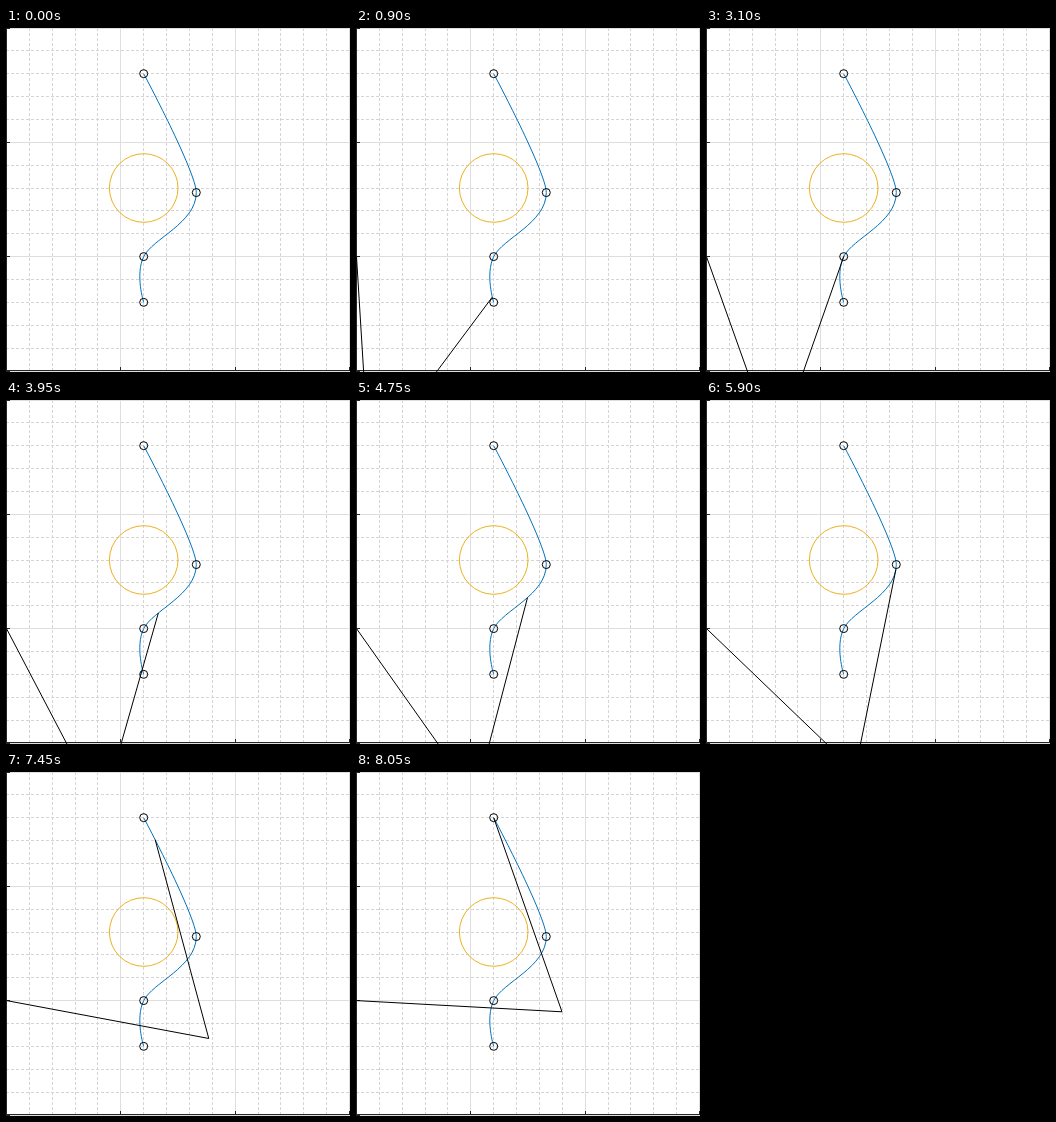
Animation of 344 by 344 pixels, one loop 8.1 s. Source, as an HTML page:

```html
<!DOCTYPE html>
<html lang="en">
<head>
<meta charset="utf-8">
<title>Two-link arm following a path</title>
<style>
html, body { margin: 0; width: 100%; height: 100%; overflow: hidden; background: #fff; }
svg { display: block; width: 344px; height: 344px; }
</style>
</head>
<body>
<svg viewBox="0 0 344 344" fill="none" stroke-width="1">
  <path id="minor" stroke="#d4d4d4" stroke-dasharray="3 2"/>
  <path id="major" stroke="#dedede"/>
  <path id="axes" stroke="#262626"/>
  <path id="curve" stroke="#0072bd"/>
  <circle id="obstacle" stroke="#edb120"/>
  <g id="markers" stroke="#000"></g>
  <path id="arm" stroke="#000" stroke-linejoin="round"/>
</svg>
<script>
const UNIT = 343 / 3, BASE = { x: 0.5, y: 228.6 }, LINK = 1.8;
const LOOP = 8100, START = 100, STEP = 50, SAMPLES = 160, DURATION = 8;

// Points on the path with their times and velocities
const knots = [
  { t: 0, x: 1.2,  y: -0.4, vx: 0,      vy: 0 },
  { t: 3, x: 1.2,  y: 0,    vx: 0.0767, vy: 0.158 },
  { t: 6, x: 1.66, y: 0.56, vx: 0,      vy: 0.265 },
  { t: 8, x: 1.2,  y: 1.6,  vx: 0,      vy: 0 }
];

const el = id => document.getElementById(id);
const px = x => BASE.x + x * UNIT;
const py = y => BASE.y - y * UNIT;
const at = (x, y) => `${px(x).toFixed(2)} ${py(y).toFixed(2)}`;

function drawGrid() {
  let minor = '', major = '', axes = 'M.5 0V343M0 342.5H344';
  for (let i = 0; i <= 15; i++) {
    const x = Math.floor(i * UNIT / 5 + 0.5) + 0.5;
    const y = Math.floor(i * UNIT / 5) + 0.5;
    const lines = `M${x} 0V343M0 ${y}H344`;
    if (i % 5) {
      minor += lines;
    } else {
      major += lines;
      axes += `M${x} 342v-3M0 ${y}h4`;
    }
  }
  el('minor').setAttribute('d', minor);
  el('major').setAttribute('d', major);
  el('axes').setAttribute('d', axes);
}

function addCircle(node, x, y, r) {
  node.setAttribute('cx', px(x));
  node.setAttribute('cy', py(y));
  node.setAttribute('r', r);
}

function drawPath() {
  let d = `M${at(knots[0].x, knots[0].y)}`;
  for (let i = 1; i < knots.length; i++) {
    const a = knots[i - 1], b = knots[i], k = (b.t - a.t) / 3;
    d += `C${at(a.x + k * a.vx, a.y + k * a.vy)} ${at(b.x - k * b.vx, b.y - k * b.vy)} ${at(b.x, b.y)}`;
  }
  el('curve').setAttribute('d', d);
  addCircle(el('obstacle'), 1.2, 0.6, 0.3 * UNIT);
  for (const p of knots) {
    const dot = document.createElementNS('http://www.w3.org/2000/svg', 'circle');
    addCircle(dot, p.x, p.y, 4);
    el('markers').append(dot);
  }
}

function hermite(p0, v0, p1, v1, h, s) {
  const r = 1 - s;
  return p0 * r * r * (1 + 2 * s) + p1 * s * s * (3 - 2 * s) + h * s * r * (v0 * r - v1 * s);
}

function tipAt(t) {
  const i = t < knots[1].t ? 0 : t < knots[2].t ? 1 : 2;
  const a = knots[i], b = knots[i + 1], h = b.t - a.t, s = (t - a.t) / h;
  return {
    x: hermite(a.x, a.vx, b.x, b.vx, h, s),
    y: hermite(a.y, a.vy, b.y, b.vy, h, s)
  };
}

// Elbow of two equal links, bent to the right of the base-to-tip line
function elbowFor(tip) {
  const d = Math.hypot(tip.x, tip.y);
  const k = Math.sqrt(LINK * LINK - d * d / 4) / d;
  return { x: tip.x / 2 + tip.y * k, y: tip.y / 2 - tip.x * k };
}

function render(ms) {
  if (ms < START) {
    el('arm').setAttribute('d', '');
    return;
  }
  const index = Math.min(SAMPLES - 1, Math.floor((ms - START) / STEP));
  const tip = tipAt(index / (SAMPLES - 1) * DURATION);
  const elbow = elbowFor(tip);
  el('arm').setAttribute('d', `M${at(0, 0)}L${at(elbow.x, elbow.y)}L${at(tip.x, tip.y)}`);
}

drawGrid();
drawPath();
const began = performance.now();
function tick() {
  render((performance.now() - began) % LOOP);
  requestAnimationFrame(tick);
}
tick();
</script>
</body>
</html>
```
